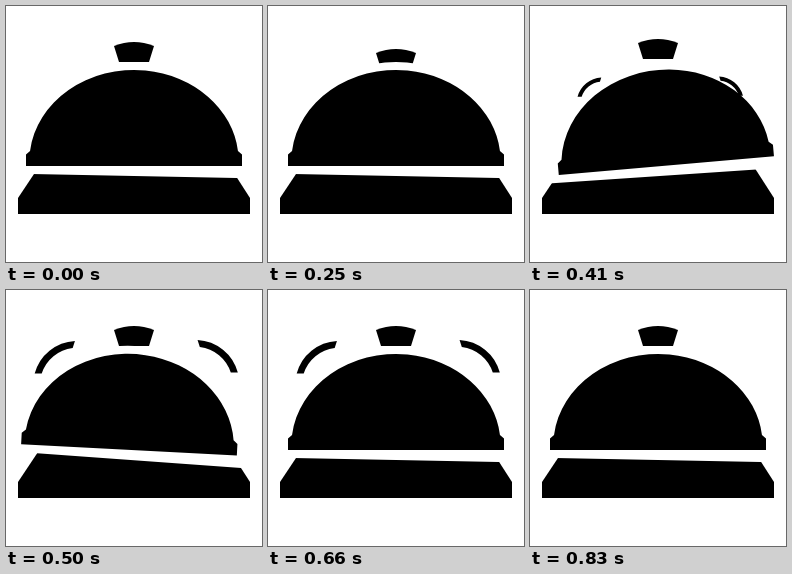
An HTML page with a canvas for the animation above (1160 ms loop, 256 px wide and 256 px high).

```html
<!DOCTYPE html>
<html lang="en">
<head>
<meta charset="utf-8">
<title>Ringing bell</title>
<style>
  html, body { margin: 0; width: 100%; height: 100%; overflow: hidden; background: #fff; }
  canvas { display: block; width: 256px; height: 256px; }
</style>
</head>
<body>
<canvas id="stage" width="256" height="256"></canvas>
<script>
const ctx = document.getElementById('stage').getContext('2d');
const LOOP = 1160, FPS = 24;
const DOME = { rx: 104.6, ry: 91, gap: 8 };
const SWINGS = [0, 5, -5, 3, -3, 0];   // degrees, two steps apart
const SWING_START = 6;
const WAVE_STARTS = [10, 14], WAVE_LIFE = 6;

const rad = deg => deg * Math.PI / 180;
const ramp = (from, to, t) => Math.min(1, Math.max(0, (t - from) / (to - from)));

// Pushed down, springs up past its rest, settles
const press = t => 7 * ramp(3, 6, t) - 10 * ramp(6, 10, t) + 3 * ramp(10, 12, t);

function swing(t) {
  const last = SWINGS.length - 1;
  const pos = ramp(SWING_START, SWING_START + 2 * last, t) * last;
  const i = Math.min(Math.floor(pos), last - 1);
  return SWINGS[i] + (SWINGS[i + 1] - SWINGS[i]) * (pos - i);
}

function shape(color, trace) {
  ctx.fillStyle = color;
  ctx.beginPath();
  trace();
  ctx.fill();
}

const lines = (...points) => points.forEach(p => ctx.lineTo(...p));

function at(x, y, draw) {
  ctx.save();
  ctx.translate(x, y);
  draw();
  ctx.restore();
}

// The bell swings around the top of its dome
function swung(angle, draw) {
  at(128, 64, () => {
    ctx.rotate(rad(angle));
    draw();
  });
}

function button() {
  shape('#000', () => {
    ctx.moveTo(-20, 40);
    ctx.quadraticCurveTo(0, 32, 20, 40);
    lines([15, 56], [-15, 56]);
  });
}

// White rim that hides the pressed part of the button
function domeGap() {
  const { rx, ry, gap } = DOME;
  shape('#fff', () => ctx.ellipse(0, ry, rx + gap, ry + gap, 0, Math.PI, 2 * Math.PI));
}

function base() {
  shape('#000', () => lines([12, 208], [12, 192], [40, 150], [217, 150], [244, 192], [244, 208]));
}

function bell() {
  // The gap under the bell trims the base
  shape('#fff', () => lines([-140, 40], [140, 40], [140, 108.7], [-140, 103.2]));
  const { rx, ry } = DOME, shoulder = Math.asin((ry - 81) / ry);
  shape('#000', () => {
    lines([-108, 96], [-108, 84.5]);
    ctx.ellipse(0, ry, rx, ry, 0, Math.PI + shoulder, 2 * Math.PI - shoulder);
    lines([108, 84.5], [108, 96]);
  });
}

function wave(age) {
  const size = 0.44 + 0.17 * age - 0.0083 * age * age;
  for (const side of [1, -1]) {
    at(130.25 - side * 55.65, 100.5 + side / 2, () => {
      ctx.scale(side * size, size);
      shape('#000', () => {
        ctx.arc(-4.5, -8, 59, rad(195), rad(267));
        ctx.arc(-4.5, -8, 50, rad(263), rad(198), true);
      });
    });
  }
}

function render(step) {
  const angle = swing(step);
  ctx.fillStyle = '#fff';
  ctx.fillRect(0, 0, 256, 256);
  at(128, press(step), button);
  swung(angle, domeGap);
  base();
  swung(angle, bell);
  for (const start of WAVE_STARTS) {
    const age = step - start;
    if (age >= 0 && age < WAVE_LIFE) wave(age);
  }
}

function tick() {
  const t = performance.now() % LOOP;
  // Step times are cut to whole hundredths of a second
  const cut = Math.floor(t / 10) * 10 + 9.99;
  render(Math.floor(cut * FPS / 1000));
  requestAnimationFrame(tick);
}
tick();
</script>
</body>
</html>
```
